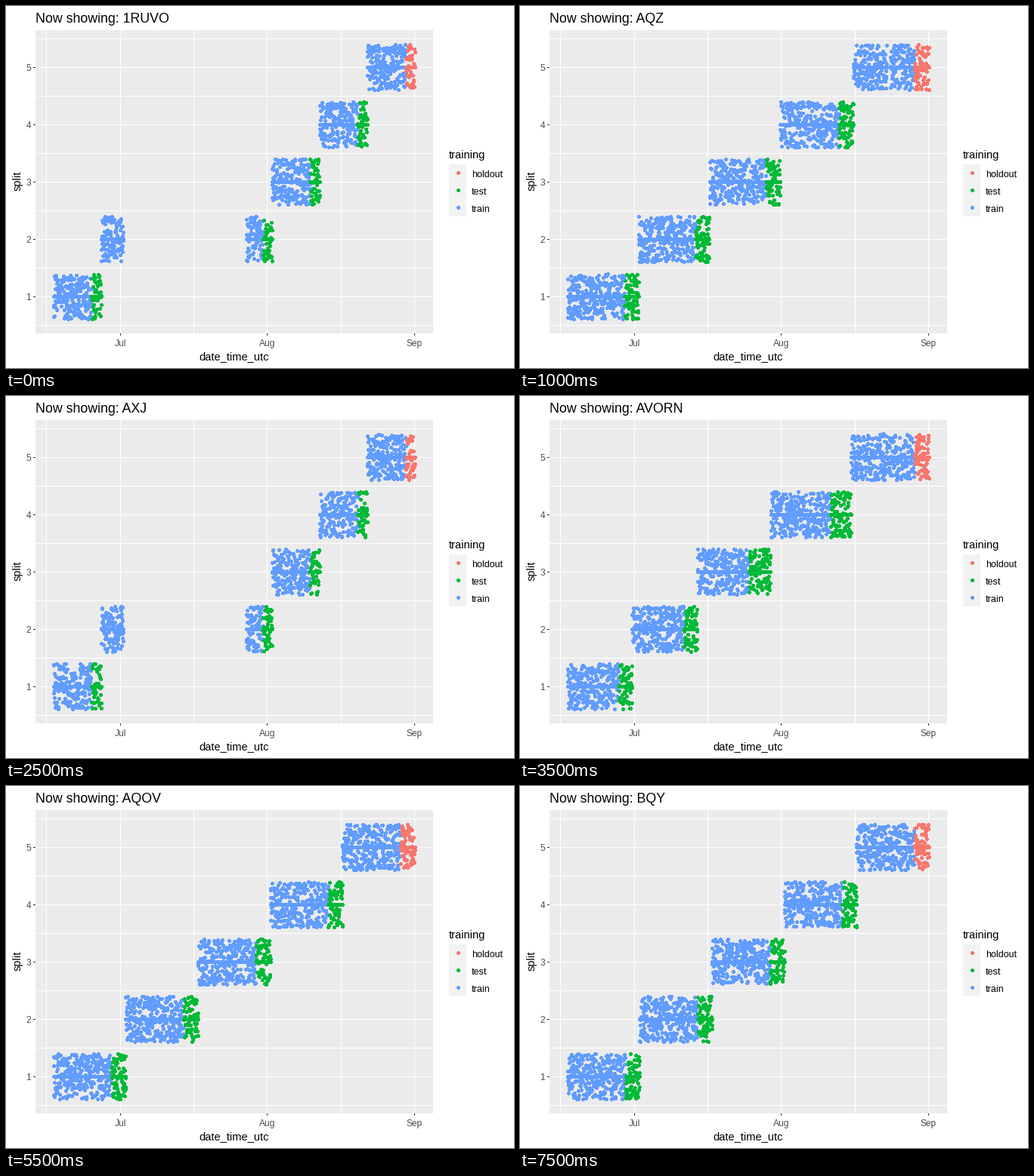
A matplotlib script that plays this animation: 672 px wide and 480 px high, repeating every 8 s.

```python
import numpy as np
import matplotlib.pyplot as plt
from matplotlib.animation import FuncAnimation
from matplotlib.patches import Rectangle

W, H, DPI = 672, 480, 96
PX = 72 / DPI
HOUR = 0.261   # pixels per hourly sample
STEP = 76.05   # pixels between splits
DOT = (4.1 * PX) ** 2  # without antialiasing this fills a round 5 px dot
COLORS = {"holdout": "#F8766D", "test": "#00BA38", "train": "#619CFF"}
NAMES = ["1RUVO", "AQZ", "AXJ", "AVORN", "AKZU", "AQOV", "AWJ", "BQY"]

# Split edges, train/test cuts, and an optional (row, left, right) hole.
EVEN = np.linspace(63.3, 541.3, 6)
REGULAR = (EVEN, EVEN[:-1] + 76.5, None)
BROKEN = ([63.3, 126.5, 352.3, 415.3, 478.3, 541.3],
          [113.8, 340.5, 402.8, 465.8, 529.3], (1, 155.5, 318.3))
WIDE = ([63.3, 157.3, 251, 344.8, 441.3, 541.3],
        [138.8, 232.8, 326, 422.3, 522.3], (4, 485.5, 490))
UNEVEN = ([63.3, 148.8, 235, 332, 438.3, 541.3],
          [131.3, 217.5, 303, 411.3, 522.8], None)
LAYOUTS = [BROKEN, WIDE, REGULAR, BROKEN, UNEVEN,
           REGULAR, REGULAR, REGULAR, REGULAR]

plt.rcParams["font.family"] = "Liberation Sans"
fig = plt.figure(figsize=(W / DPI, H / DPI), dpi=DPI, facecolor="white")
ax = fig.add_axes([0, 0, 1, 1])
ax.set(xlim=(0, W), ylim=(H, 0))
ax.axis("off")


def row_y(split):
    return 81.4 + STEP * (5 - split)


def box(x, y, w, h, color):
    ax.add_patch(Rectangle((x, y), w, h, fc=color, lw=0,
                           antialiased=False, zorder=1))


def label(x, y, text, size, color="black", **kw):
    return ax.text(x, y, text, fontsize=size * PX, color=color,
                   va="baseline", **kw)


def dots(xy, colors):
    return ax.scatter(*np.transpose(xy), s=DOT, c=colors, linewidths=0,
                      antialiased=False, zorder=3)


def cloud(index):
    """Hourly samples per split: a jittered block plus its centre line."""
    rng = np.random.default_rng(40 + index)
    edges, cuts, hole = LAYOUTS[index]
    pts, cols = [], []
    for row in range(5):
        x = np.arange(edges[row], edges[row + 1], HOUR)
        if hole and hole[0] == row:
            x = x[(x < hole[1]) | (x > hole[2])]
        y = row_y(row + 1)
        last = "holdout" if row == 4 else "test"
        for kind, part in (("train", x[x < cuts[row]]),
                           (last, x[x >= cuts[row]])):
            n = len(part)
            jitter = y + rng.uniform(-0.4, 0.4, n) * STEP
            pts += [np.c_[part, jitter], np.c_[part, np.full(n, y)]]
            cols += [COLORS[kind]] * (2 * n)
    return np.floor(np.concatenate(pts)) + 0.5, cols


# Panel and grid
box(39, 32, 526, 402, "#EBEBEB")
for x in (53, 151, 248, 345, 443, 540):
    box(x, 32, 1, 402, "white")
for half in range(1, 12):
    box(39, int(row_y(half / 2)), 526, 1, "white")

# Axes
GREY = "#4D4D4D"
for x, month in ((151, "Jul"), (345, "Aug"), (540, "Sep")):
    box(x, 434, 1, 3, "#333333")
    label(x + 0.5, 451, month, 12, GREY, ha="center")
for split in range(1, 6):
    y = int(row_y(split))
    box(36, y, 3, 1, "#333333")
    label(33, y + 5, str(split), 12, GREY, ha="right")
label(302, 469, "date_time_utc", 14.67, ha="center")
label(20, 231.5, "split", 14.67, ha="center", rotation=90,
      rotation_mode="anchor")

# Legend
label(585.5, 202, "training", 14.67)
for i, kind in enumerate(COLORS):
    box(586, 210 + 23 * i, 23, 23, "#F2F2F2")
    label(616, 227 + 23 * i, kind, 12.5)
dots([(598.5, 221.5 + 23 * i) for i in range(3)], list(COLORS.values()))

title = label(39, 22, "", 17.7)
clouds = [cloud(i) for i in range(len(LAYOUTS))]
points = dots(*clouds[0])


def update(frame):
    # Titles and data change on alternate half seconds.
    title.set_text("Now showing: " + NAMES[frame // 2])
    xy, cols = clouds[(frame + 1) // 2]
    points.set_offsets(xy)
    points.set_facecolor(cols)
    return title, points


anim = FuncAnimation(fig, update, frames=16, interval=500, repeat=True,
                     repeat_delay=0)
plt.show()
```
